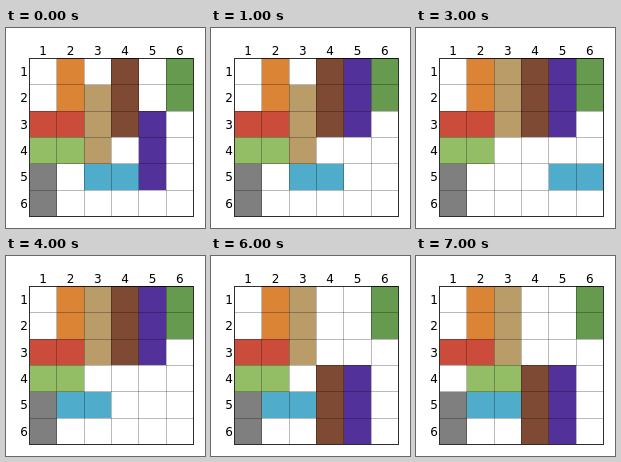
Recreate the animation shown at these times as an HTML page. Size 199 by 200 pixels, loop 8 s.

```html
<!DOCTYPE html>
<html lang="en">
<head>
<meta charset="utf-8">
<title>Sliding blocks</title>
<style>
  html, body { margin: 0; width: 100%; height: 100%; overflow: hidden; background: #fff; }
  svg { position: absolute; left: 0; top: 0; width: 199px; height: 200px; }
  text { font: 12px "DejaVu Sans", sans-serif; text-anchor: middle; }
  .block { position: absolute; animation: 8s step-end infinite; }

  .orange { left: 51px; top: 30px; width: 27px; height: 53px; background: #db8436; }
  .forest { left: 160px; top: 30px; width: 27px; height: 53px; background: #659a4f; }
  .red    { left: 24px; top: 83px; width: 54px; height: 26px; background: #cc4c3c; }
  .gray   { left: 24px; top: 136px; width: 27px; height: 52px; background: #7f7f7f; }
  .brown  { left: 105px; top: 30px; width: 28px; height: 79px; background: #7f4a33; animation-name: brown; }
  .tan    { left: 78px; top: 57px; width: 27px; height: 79px; background: #ba9c69; animation-name: tan; }
  .purple { left: 133px; top: 83px; width: 27px; height: 79px; background: #52329a; animation-name: purple; }
  .lime   { left: 24px; top: 109px; width: 54px; height: 27px; background: #93be66; animation-name: lime; }
  .cyan   { left: 78px; top: 136px; width: 55px; height: 26px; background: #4faccb; animation-name: cyan; }

  @keyframes purple { 12.5% { top: 30px; } 75%, 100% { top: 109px; } }
  @keyframes cyan {
    25% { left: 133px; width: 54px; }
    50%, 100% { left: 51px; width: 54px; }
  }
  @keyframes tan { 37.5%, 100% { top: 30px; } }
  @keyframes brown { 62.5%, 100% { top: 109px; } }
  @keyframes lime { 87.5%, 100% { left: 51px; } }
</style>
</head>
<body>
<div class="block orange"></div>
<div class="block forest"></div>
<div class="block red"></div>
<div class="block gray"></div>
<div class="block brown"></div>
<div class="block tan"></div>
<div class="block purple"></div>
<div class="block lime"></div>
<div class="block cyan"></div>
<svg viewBox="0 0 199 200">
  <path id="grid" stroke="#000" stroke-opacity=".27" fill="none"/>
  <rect x="23.5" y="30.5" width="164" height="158" fill="none" stroke="#000" stroke-opacity=".82"/>
  <g id="labels"></g>
</svg>
<script>
  const labels = document.getElementById('labels');
  const left = 23.5, top0 = 30.5, cellW = 164 / 6, cellH = 158 / 6;

  function label(n, x, y) {
    const t = document.createElementNS('http://www.w3.org/2000/svg', 'text');
    t.setAttribute('x', x);
    t.setAttribute('y', y);
    t.textContent = n;
    labels.append(t);
  }

  const snap = v => Math.floor(v) + 0.5;
  let d = '';
  for (let i = 0; i < 6; i++) {
    if (i) {
      d += `M${snap(left + i * cellW)} 31V188`;
      d += `M24 ${snap(top0 + i * cellH)}H187`;
    }
    label(i + 1, left + (i + 0.5) * cellW, 27);
    label(i + 1, 18, Math.round(48 + i * cellH));
  }
  document.getElementById('grid').setAttribute('d', d);
</script>
</body>
</html>
```
